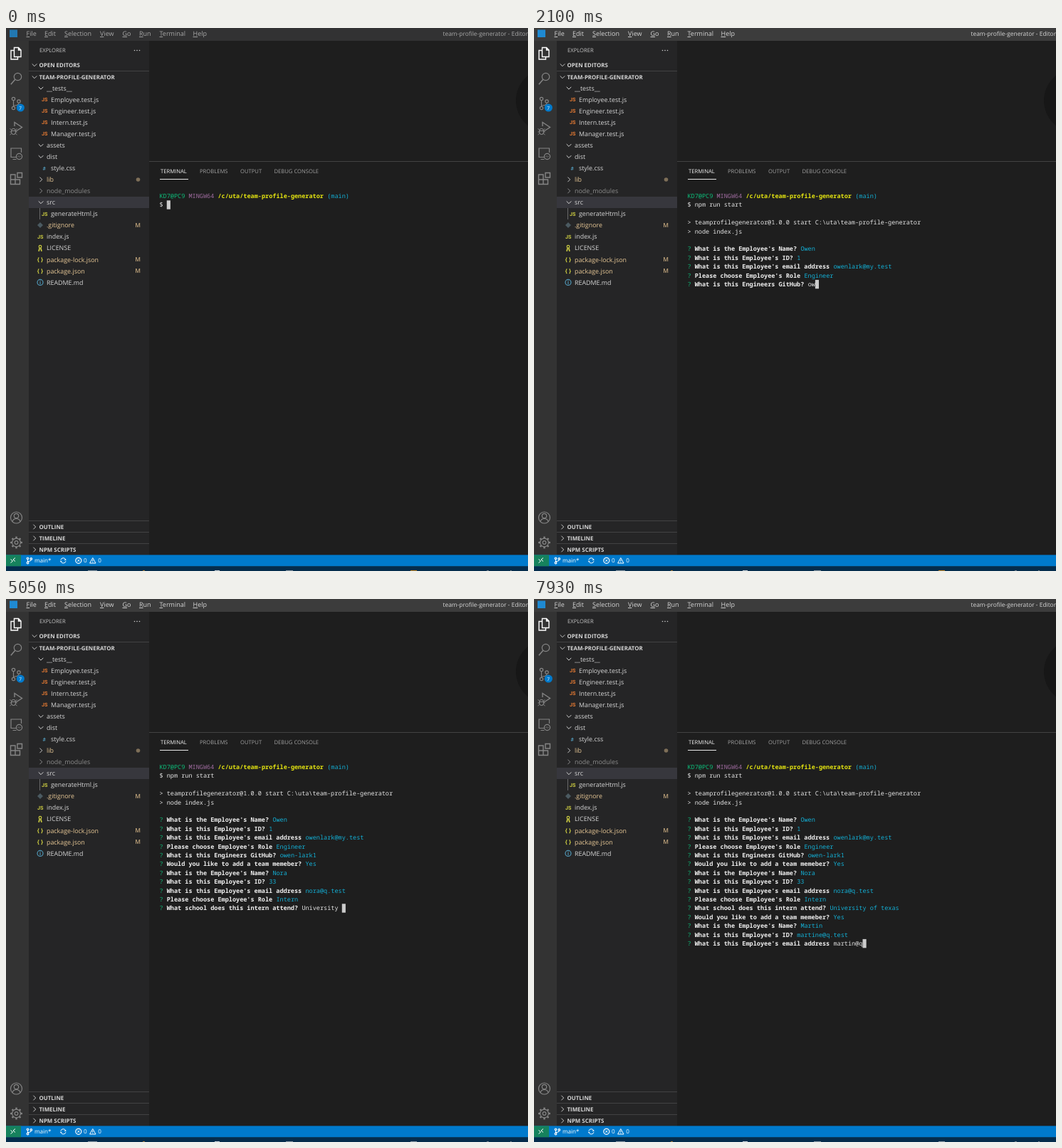
Write an HTML page that moves like this. It is 733 px wide and 763 px high and loops after 8000 ms.

```html
<!DOCTYPE html>
<html lang="en">
<head>
<meta charset="utf-8">
<title>Terminal session</title>
<style>
  html, body { margin: 0; width: 100%; height: 100%; overflow: hidden; background: #1e1e1e; }
  svg { display: block; }
  text { font: 9px "Open Sans", "Noto Sans", sans-serif; fill: #d6d6d6; white-space: pre; text-rendering: geometricPrecision; }
  .file { font-size: 8.9px; }
  .bold { font-weight: 700; font-size: 7.9px; }
  .caps { font-size: 7.65px; }
  .title { font-size: 8.4px; }
  .status { font-size: 8.1px; fill: #fff; }
  .badge { font-size: 6.6px; fill: #fff; }
  .glyph { font: 700 7.2px Roboto, "Liberation Sans", sans-serif; }
  .mark { font-size: 8.4px; font-weight: 600; }
  #terminal text { font: 500 8.54px "Noto Sans Mono", "DejaVu Sans Mono", monospace; }
  #terminal .strong { font-weight: 700; }
  .line { fill: none; stroke-width: 1.2; }
  .key { text-decoration: underline; }
</style>
</head>
<body>
<svg width="733" height="763" viewBox="0 0 733 763">
  <g id="frame"></g>
  <g id="terminal"></g>
</svg>
<script>
const LOOP = 8000;
const SVG = "http://www.w3.org/2000/svg";
const frame = document.getElementById("frame");
const terminal = document.getElementById("terminal");

function add(parent, tag, attrs, content) {
  const el = document.createElementNS(SVG, tag);
  for (const name in attrs) el.setAttribute(name, attrs[name]);
  if (content !== undefined) el.textContent = content;
  return parent.appendChild(el);
}
const rect = (x, y, width, height, fill) => add(frame, "rect", { x, y, width, height, fill });
const disc = (cx, cy, r, fill) => add(frame, "circle", { cx, cy, r, fill });
const ring = (cx, cy, r, stroke) => add(frame, "circle", { cx, cy, r, stroke, class: "line" });
const path = (d, stroke, width = 1.2) => add(frame, "path", { d, stroke, class: "line", style: `stroke-width:${width}` });
function label(x, y, content, cls = "", fill = "") {
  return add(frame, "text", { x, y, class: cls, style: fill && `fill:${fill}` }, content);
}
function chevron(x, y, open, color = "#c5c5c5") {
  path(open ? `M${x - 3.3} ${y - 1.6}l3.3 3.3 3.3-3.3` : `M${x - 1.6} ${y - 3.3}l3.3 3.3-3.3 3.3`, color, 1);
}

// Window areas
const titleBar = rect(0, 0, 733, 18, "#323233");
rect(0, 18, 32, 723, "#333");
rect(32, 18, 169, 723, "#252526");
rect(201, 187, 532, 1, "#434343");
disc(761, 102, 45, "#171717");

// Title bar
const logo = rect(5, 2.5, 11, 10.5, "#1f8ad2");
const menu = Object.entries({ File: 28.5, Edit: 54, Selection: 82, View: 132, Go: 163.5, Run: 187, Terminal: 215.5, Help: 262.5 })
  .map(([name, x]) => {
    const item = add(frame, "text", { x, y: 11 });
    add(item, "tspan", { class: "key" }, name[0]);
    add(item, "tspan", {}, name.slice(1));
    return item;
  });
const title = label(613.5, 11, "team-profile-generator - Editor", "title");

// Activity bar
const GRAY = "#858585";
path("M11.5 27.5h6l3.5 3.5v9.5h-9.5zM17.5 27.5v3.5h3.5M11.5 31.5h-4.5v12.5h9.5v-3.5", "#fff", 1.4);
ring(16.5, 68.5, 5.2, GRAY);
path("M12.8 72.2l-6 7", GRAY, 1.5);
ring(10.5, 99.5, 2.2, GRAY);
ring(10.5, 112.5, 2.2, GRAY);
ring(18, 103, 2.2, GRAY);
path("M10.5 102v8M18 105.5q-.5 3.5-7 3.5", GRAY);
disc(20.3, 112, 5.6, "#007acc");
label(18.3, 114.6, "7", "badge");
path("M12 138v-5.5l10.5 7-8.5 5.5", GRAY, 1.4);
add(frame, "ellipse", { cx: 10.5, cy: 145.5, rx: 3, ry: 4, stroke: GRAY, class: "line" });
path("M7.5 144.5h6M5.5 141.5l2 1.5M15.5 141.5l-2 1.5M5.5 146h2M15.5 146h-2M5.5 150l2-1.5M15.5 150l-2-1.5", GRAY, 1);
path("M14 181.5h-7v-12.5h14.5v6M9.5 184.5h5", GRAY);
ring(18.5, 180.5, 4.1, GRAY);
path("M16.5 181l1.5-1.5M18.8 181.5l1.6-1.6", GRAY, 1);
path("M6.5 206h6.5v13.5h-6.5zM6.5 213h13v6.5h-7M16 203.5h6.5v6.5h-6.5z", GRAY, 1.4);
ring(14.5, 688, 8, GRAY);
ring(14.5, 685.5, 3.2, GRAY);
path("M9 693.5q1-4 5.5-4t5.5 4", GRAY);
ring(14.5, 723, 2.3, GRAY);
ring(14.5, 723, 5.9, GRAY);
for (let i = 0; i < 8; i++) {
  const c = Math.cos(i * Math.PI / 4), s = Math.sin(i * Math.PI / 4);
  path(`M${14.5 + 6 * c} ${723 + 6 * s}L${14.5 + 8.4 * c} ${723 + 8.4 * s}`, GRAY, 2.4);
}

// Explorer
label(47, 34, "EXPLORER", "caps", "#c4c4c4");
for (const x of [180.5, 184, 187.5]) disc(x, 31.5, 0.8, "#ccc");
const section = (y, name, open) => {
  chevron(40, y, open);
  label(46.5, y + 2.9, name, "bold");
};
section(52, "OPEN EDITORS", true);
section(69, "TEAM-PROFILE-GENERATOR", true);
["OUTLINE", "TIMELINE", "NPM SCRIPTS"].forEach((name, i) => section(701 + 16 * i, name, false));
for (const y of [60, 692, 708, 724]) rect(32, y, 169, 1, "#424243");
rect(32, 237, 169, 16, "#37373d");
rect(47, 253, 1, 16, "#6a6a6a");

const ORANGE = "#e37933", YELLOW = "#cbcb41", BLUE = "#519aba", MODIFIED = "#e8c896";
const icons = {
  open: (x, y, color) => chevron(x + 5, y, true, color),
  shut: (x, y, color) => chevron(x + 5, y, false, color),
  test: (x, y) => label(x + 6 - 6, y + 2.6, "JS", "glyph", ORANGE),
  js: (x, y) => label(x, y + 2.6, "JS", "glyph", YELLOW),
  css: (x, y) => label(x + 1.5, y + 2.8, "#", "glyph", BLUE),
  json: (x, y) => label(x - 0.2, y + 2.8, "{ }", "bold", YELLOW),
  git: (x, y) => add(frame, "path", { d: `M${x} ${y}l4-4 4 4-4 4z`, fill: "#4b5a61" }),
  key: (x, y) => {
    ring(x + 4, y - 2, 1.8, YELLOW);
    path(`M${x + 3.2} ${y}l-1.2 4.5M${x + 4.8} ${y}l1.2 4.5`, YELLOW, 1.7);
  },
  info: (x, y) => {
    ring(x + 4, y, 4, BLUE);
    path(`M${x + 4} ${y - 2.3}v1.2M${x + 4} ${y - 0.4}v2.8`, BLUE);
  }
};
const tree = [
  ["__tests__", "open", 0], ["Employee.test.js", "test", 1], ["Engineer.test.js", "test", 1],
  ["Intern.test.js", "test", 1], ["Manager.test.js", "test", 1], ["assets", "open", 0],
  ["dist", "open", 0], ["style.css", "css", 1], ["lib", "shut", 0, MODIFIED],
  ["node_modules", "shut", 0, "#8c8c8c"], ["src", "open", 0], ["generateHtml.js", "js", 1],
  [".gitignore", "git", 0, MODIFIED, "M"], ["index.js", "js", 0], ["LICENSE", "key", 0],
  ["package-lock.json", "json", 0, MODIFIED, "M"], ["package.json", "json", 0, MODIFIED, "M"],
  ["README.md", "info", 0]
];
tree.forEach(([name, icon, depth, color = "#d6d6d6", mark], i) => {
  const y = 84.4 + 16.06 * i;
  icons[icon](44 + 6 * depth, y, color === MODIFIED ? "#c5c5c5" : color);
  label(57 + 6 * depth, y + 3.2, name, "file", color);
  if (mark) label(181.3, y + 3.1, mark, "mark", "#c0a47c");
});
disc(185.5, 213, 2.8, "#7e6f58");

// Panel tabs
Object.entries({ TERMINAL: 217, PROBLEMS: 272, OUTPUT: 329, "DEBUG CONSOLE": 376.5 })
  .forEach(([name, x], i) => label(x, 203.5, name, "caps", i ? "#a0a0a0" : "#f0f0f0"));
rect(216, 212, 40, 1, "#e7e7e7");

// Status bar
rect(0, 740.4, 733, 16.1, "#007acc");
rect(0, 740.4, 21, 16.1, "#16825d");
path("M6.5 746.5l3 2.5-3 2.5M13 744.5l-3 2.5 3 2.5", "#fff", 1);
ring(30.5, 745.3, 1.3, "#fff");
ring(30.5, 751.5, 1.3, "#fff");
ring(35.3, 746, 1.3, "#fff");
path("M30.5 746.5v4M35.3 747.5q0 2-4.5 2", "#fff", 1);
label(40, 751.4, "main*", "status");
path("M76.8 747.5a3.7 3.7 0 0 1 7-.5M84 749.2a3.7 3.7 0 0 1-7 .5M82 747.3h2.5M76 749.3h2.5", "#fff", 1);
ring(101.8, 748.3, 4, "#fff");
path("M100.2 746.7l3.2 3.2M103.4 746.7l-3.2 3.2", "#fff", 1);
label(109, 751.4, "0", "status");
path("M121.8 744.5l4.2 7.5h-8.4zM121.8 747v2.5M121.8 750.3v.8", "#fff", 1);
label(129.3, 751.4, "0", "status");

// Taskbar
rect(0, 756.5, 733, 6.5, "#042c4c");
rect(115, 762, 13, 1, "#8b9aa6");
rect(192, 762, 3, 1, "#a8813c");
rect(293, 762, 7, 1, "#c9d3da");
rect(393, 762, 10, 1, "#8b9aa6");
const tray = rect(568, 762, 9, 1, "#c58a2a");
rect(675, 762, 3, 1, "#71808c");
rect(708, 762, 2, 1, "#71808c");

// Terminal
const WHITE = "#e4e4e4", CYAN = "#13b0d6", GREEN = "#0dbc79", DIM = "#858585";
const CELL = 5.125, ROW = 12.4, LEFT = 215.5, TOP = 229.9;
const NAME = "What is the Employee's Name?", ID = "What is this Employee's ID?";
const EMAIL = "What is this Employee's email address", ROLE = "Please choose Employee's Role";
const MORE = "Would you like to add a team memeber?";
const ROLES = ["Engineer", "Intern", "Manager"];

// Keys are [first key time, last key time, text]
const command = [[170, 810, "npm run start"]];
const prompts = [
  { ask: NAME, keys: [[1090, 1240, "Owen"]], done: 1290 },
  { ask: ID, keys: [[1340, 1340, "1"]], done: 1390 },
  { ask: EMAIL, keys: [[1440, 1800, "owenlark@my.test"]], done: 1860 },
  { ask: ROLE, pick: 0, moved: Infinity, done: 1960 },
  { ask: "What is this Engineers GitHub?", keys: [[2040, 2100, "ow"], [2200, 2510, "en-lark1"]], done: 2610 },
  { ask: MORE, hint: "(Y/n) ", answer: "Yes", keys: [[2730, 2730, "y"]], done: 2850 },
  { ask: NAME, keys: [[3030, 3150, "Nor"], [3170, 3170, "a"]], done: 3260 },
  { ask: ID, keys: [[3340, 3420, "33"]], done: 3500 },
  { ask: EMAIL, keys: [[3700, 4130, "nora@q.test"]], done: 4210 },
  { ask: ROLE, pick: 1, moved: 4370, done: 4470 },
  { ask: "What school does this intern attend?", keys: [[4520, 4810, "Universit"], [4950, 5420, "y of texas"]], done: 5590 },
  { ask: MORE, hint: "(Y/n) ", answer: "Yes", keys: [[5750, 5750, "y"]], done: 5800 },
  { ask: NAME, keys: [[6020, 6640, "Martin"]], done: 6790 },
  { ask: ID, keys: [[6890, 7360, "martine@q.test"]], done: 7420 },
  { ask: EMAIL, keys: [[7480, 7640, "mart"], [7740, 7930, "in@q"]], done: Infinity }
];

const allKeys = keys => keys.map(key => key[2]).join("");
function typed(keys, t) {
  return keys.map(([from, to, text]) => {
    if (t < from) return "";
    const gap = (to - from) / Math.max(1, text.length - 1);
    return text.slice(0, gap ? Math.floor((t - from) / gap + 1.001) : text.length);
  }).join("");
}

function screenAt(t) {
  const rows = [[
    ["KD7@PC9 ", GREEN], ["MINGW64 ", "#a06ca0"],
    ["/c/uta/team-profile-generator ", "#e5e510", true], ["(main)", CYAN]
  ]];
  rows.push([["$ " + typed(command, t), WHITE]]);
  if (t < 910) return { rows, cursor: true };
  rows.push([]);
  if (t < 960) return { rows, cursor: true };
  rows.push([["> teamprofilegenerator@1.0.0 start C:\\uta\\team-profile-generator", WHITE]]);
  rows.push([["> node index.js", WHITE]], []);
  if (t < 1030) return { rows: rows.concat([[]]), cursor: true };

  for (const p of prompts) {
    const line = [["? ", GREEN], [p.ask + " ", "#f0f0f0", true]];
    rows.push(line);
    if (t >= p.done) {
      line.push([p.answer || (p.keys ? allKeys(p.keys) : ROLES[p.pick]), CYAN]);
      continue;
    }
    if (p.keys) {
      if (p.hint) line.push([p.hint, DIM]);
      line.push([typed(p.keys, t), WHITE]);
      return { rows, cursor: true };
    }
    const chosen = t < p.moved ? 0 : p.pick;
    if (t < p.moved) line.push(["(Use arrow keys)", DIM]);
    ROLES.forEach((role, i) => rows.push([i === chosen ? ["> " + role, CYAN] : ["  " + role, WHITE]]));
    return { rows, cursor: false };
  }
}

let shown = "";
function drawTerminal({ rows, cursor }) {
  const state = JSON.stringify([rows, cursor]);
  if (state === shown) return;
  shown = state;
  terminal.replaceChildren();
  let column = 0;
  rows.forEach((line, i) => {
    column = 0;
    for (const [text, fill, strong] of line) {
      add(terminal, "text", {
        x: LEFT + column * CELL, y: TOP + i * ROW + 9.1,
        style: `fill:${fill}`, class: strong ? "strong" : ""
      }, text);
      column += text.length;
    }
  });
  if (cursor) {
    add(terminal, "rect", {
      x: LEFT + column * CELL, y: TOP + (rows.length - 1) * ROW,
      width: CELL, height: ROW, fill: "#ccc"
    });
  }
}

function draw(t) {
  const focused = t >= 100;
  const titleColor = focused ? "#d6d6d6" : "#a8a8a8";
  titleBar.setAttribute("fill", focused ? "#3c3c3c" : "#323233");
  logo.setAttribute("opacity", focused ? 1 : 0.8);
  for (const item of [...menu, title]) item.style.fill = titleColor;
  tray.setAttribute("fill", t < 4600 ? "#c58a2a" : "#8b9aa6");
  drawTerminal(screenAt(t));
}

const start = performance.now();
function tick() {
  draw((performance.now() - start) % LOOP);
  requestAnimationFrame(tick);
}
tick();
</script>
</body>
</html>
```
